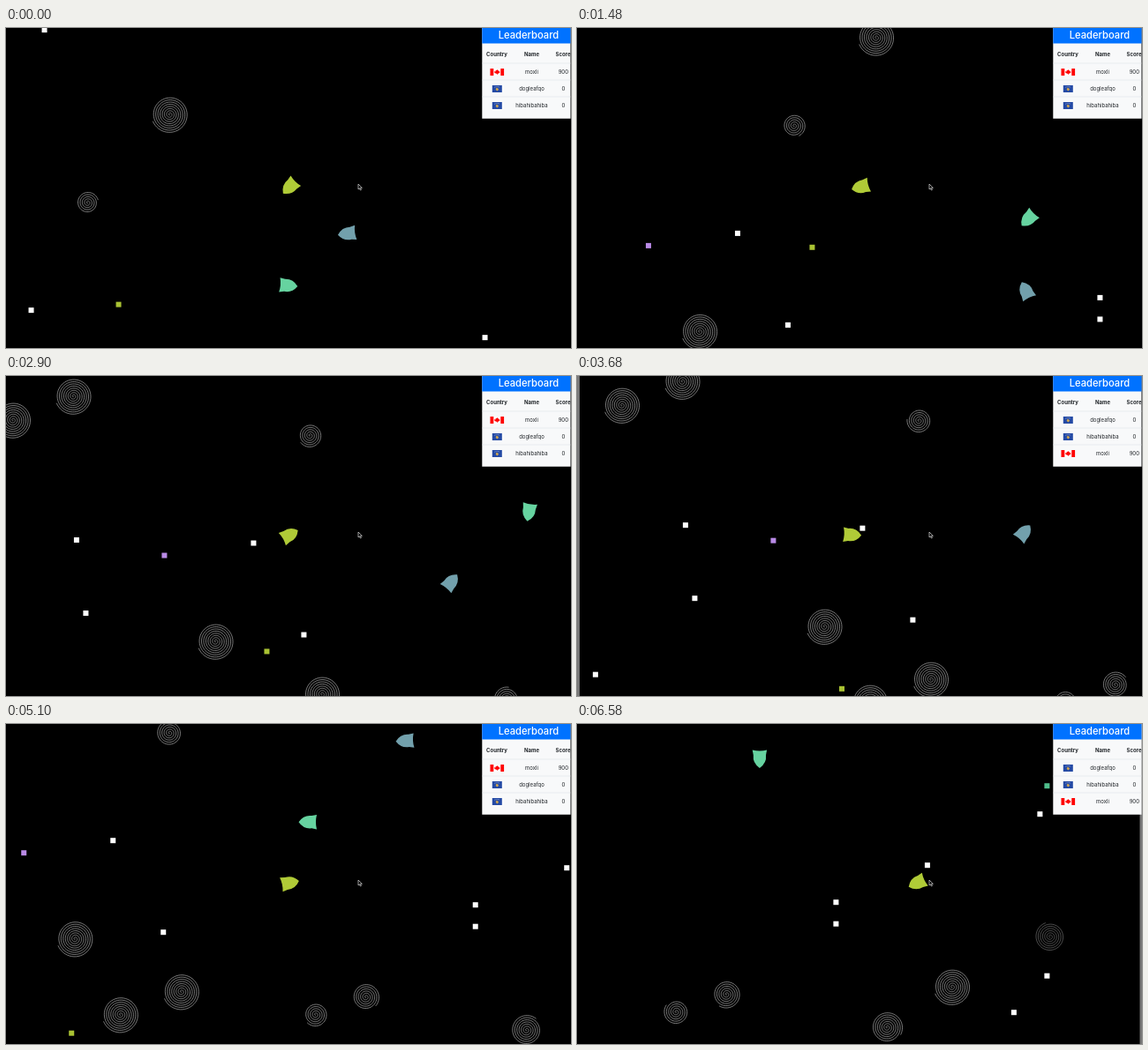
Recreate the animation shown at these times as an HTML page with a canvas. Size 640 by 363 pixels, loop 6.6 s.

```html
<!DOCTYPE html>
<html lang="en">
<head>
<meta charset="utf-8">
<title>Ships and spirals</title>
<style>
  html, body { margin: 0; width: 100%; height: 100%; overflow: hidden; background: #000; }
  canvas, svg { position: absolute; left: 0; top: 0; width: 640px; height: 363px; }
  svg { font: 6px Inter, "Liberation Sans", sans-serif; text-anchor: middle; fill: #212529; }
  .title { font-size: 11.2px; font-weight: 500; fill: #fff; }
  .head { font-weight: 700; }
</style>
</head>
<body>
<canvas id="space" width="640" height="363"></canvas>
<svg viewBox="0 0 640 363">
  <defs>
    <g id="maple">
      <path fill="#f00" d="M-7.8-4h15.6v8h-15.6z"/>
      <path fill="#fff" d="M-4-4h8v8h-8z"/>
      <path fill="#f00" d="M0-3l.8 1.2.9-.4-.2 1.7 1.5-.7-.2 1 .5.5-2 1.5H.3V3h-.6V1.8h-1l-2-1.5.5-.5-.2-1 1.5.7-.2-1.7.9.4z"/>
    </g>
    <g id="blue">
      <path fill="#244aa5" d="M-5.5-4h11v8h-11z"/>
      <path fill="#d0a650" d="M-.4-1.5L1.8.3 1 1.8-.2 2.4-1.7.6z"/>
      <path stroke="#fff" stroke-width=".6" stroke-dasharray=".6 .6" fill="none" d="M-2.8-1.8Q0-3.3 2.8-1.8"/>
    </g>
  </defs>
  <path fill="#f8f9fa" d="M539.3 0h100.2v102.7H539.3z"/>
  <path fill="#0072ff" d="M539.3 0h100.2v17.5H539.3z"/>
  <path stroke="#dee2e6" stroke-width=".6" d="M539.3 40h100.2M539.3 59h100.2M539.3 78h100.2"/>
  <text class="title" x="592" y="11.8">Leaderboard</text>
  <g class="head">
    <text x="556" y="32.4">Country</text>
    <text x="595.5" y="32.4">Name</text>
    <text x="631" y="32.4">Score</text>
  </g>
  <g class="row"><use href="#maple" x="556.3" y="0.3"/><text x="595.5" y="2">moxli</text><text x="631.3" y="2">900</text></g>
  <g class="row"><use href="#blue" x="556.3" y="0.3"/><text x="595.5" y="2">dogleafqo</text><text x="631.3" y="2">0</text></g>
  <g class="row"><use href="#blue" x="556.3" y="0.3"/><text x="595.5" y="2">hibahibahiba</text><text x="631.3" y="2">0</text></g>
  <path fill="#000" stroke="#ddd" stroke-width=".7" d="M399 177v6l1.4-1.2 1 2.2 1-.5-1-2.1h1.9z"/>
</svg>
<script>
const LOOP = 6600, W = 640, H = 363, WORLD = 1075, MARGIN = 3;
const TURN = 2 * Math.PI;
const ctx = document.getElementById('space').getContext('2d');
const rows = [...document.querySelectorAll('.row')];
const clamp = (v, lo, hi) => Math.min(hi, Math.max(lo, v));
const ease = u => u * u * (3 - 2 * u);
const progress = (t, start, length) => clamp((t - start) / length, 0, 1);

// Moments at which the pilots change course; each pose is [x, y, heading]
const times = [0, 920, 2060, 3680, 5100, 5720, 6580];
const player = {
  color: '#b0cb37',
  poses: [[612, 180, 135], [479, 238.5, 101], [439.5, 290.5, 257], [307, 327.5, 363],
    [519, 368, 348], [647, 346, 374], [821.5, 371, 515]]
};
const rivals = [
  { color: '#72a0ac',
    poses: [[677, 233, 172], [667, 385, 180], [612, 385, 308], [502, 325, 310],
      [650, 207, 177], [663, 169, 340]] },
  { color: '#66d3a0',
    poses: [[610, 292, 5], [679, 289, -134], [616, 319, -280], [644, 254, -230],
      [540, 299, -180], [534, 270, -22], [643, 230, 90]] }
];

const stars = [
  [319.5, 320], [334.5, 2], [833.5, 351], [730, 393], [730, 417.5], [376.5, 424],
  [129.5, 399.5], [119, 316.5], [17, 486], [961, 293], [931.5, 518], [969, 476.5]
];

// Spirals wind outwards until full; the young ones are listed smallest first
const PITCH = 2.45, FULL = 8.44, GROWTH = 1.53e-4;
const grown = [
  [476.5, 98], [276.5, 431.5], [115.5, 153.5], [47, 180.5], [397, 491.5], [328, 517.5], [861.5, 489]
];
const young = [[549, 517.5], [383.5, 198], [606, 497.5], [972.5, 432], [788, 535]];
const NEWEST = 3;

// Monotone cubic through one component of the poses
function at(poses, part, t) {
  const last = poses.length - 1;
  const slope = i => (poses[i + 1][part] - poses[i][part]) / (times[i + 1] - times[i]);
  const tangent = i => {
    const p = slope(Math.max(i - 1, 0)), q = slope(Math.min(i, last - 1));
    return p * q > 0 ? 2 * p * q / (p + q) : 0;
  };
  const i = clamp(times.findIndex(k => k > t) - 1, 0, last - 1);
  const next = t >= times[last] ? last - 1 : i;
  const d = times[next + 1] - times[next];
  const u = progress(t, times[next], d), v = 1 - u;
  return poses[next][part] + ease(u) * d * slope(next)
    + d * u * v * (v * tangent(next) - u * tangent(next + 1));
}

function square(x, y, color) {
  ctx.fillStyle = color;
  ctx.fillRect(x - 3, y - 3, 6, 6);
}

function spiral([x, y], turns) {
  ctx.beginPath();
  for (let k = 0; k <= turns; k += 0.02) {
    ctx.lineTo(x + PITCH * k * Math.cos(k * TURN), y + PITCH * k * Math.sin(k * TURN));
  }
  ctx.stroke();
}

const hull = new Path2D('M10.7 0Q5-8.2-4-7.1L-9.8-8.2Q-7.7 0-9.8 8.2L-4 7.1Q5 8.2 10.7 0Z');
function ship({ poses, color }, t) {
  const [x, y, heading] = [0, 1, 2].map(part => at(poses, part, t));
  ctx.save();
  ctx.translate(x + 0.5, y);
  ctx.rotate(heading * TURN / 360);
  ctx.fillStyle = color;
  ctx.fill(hull);
  ctx.restore();
}

function draw(t) {
  const camX = clamp(W / 2 - at(player.poses, 0, t), W - MARGIN - WORLD + 0.5, MARGIN);
  const camY = 180 - at(player.poses, 1, t);
  ctx.fillStyle = '#777';
  ctx.fillRect(0, 0, W, H);
  ctx.fillStyle = '#000';
  ctx.fillRect(camX, 0, WORLD, H);

  ctx.save();
  ctx.translate(camX + 0.9, camY + 0.2);
  ctx.strokeStyle = '#aaa';
  ctx.lineWidth = 0.7;
  grown.forEach(p => spiral(p, FULL));
  young.forEach((p, i) => {
    ctx.globalAlpha = i === NEWEST ? progress(t, 6200, 600) : 1;
    spiral(p, 4.6 + 0.37 * i + GROWTH * t);
  });
  ctx.globalAlpha = 1;

  stars.forEach(([x, y]) => square(x, y, '#fff'));
  square(218.5, 334, '#b98ae6');
  square(969, 261, '#4fbd8b');
  const drift = ease(progress(t, 700, 4000));
  square(418.5 - 146 * drift, 313.5 + 225 * drift, '#a9c233');
  [...rivals, player].forEach(s => ship(s, t));
  ctx.restore();

  const flipped = t >= 3100 && t < 4300 || t >= 6250;
  rows.forEach((row, i) => {
    const place = flipped ? (i + 2) % 3 : i;
    row.setAttribute('transform', `translate(0 ${49.7 + 19 * place})`);
  });
}

const began = performance.now();
function tick() {
  draw((performance.now() - began) % LOOP);
  requestAnimationFrame(tick);
}
tick();
</script>
</body>
</html>
```
